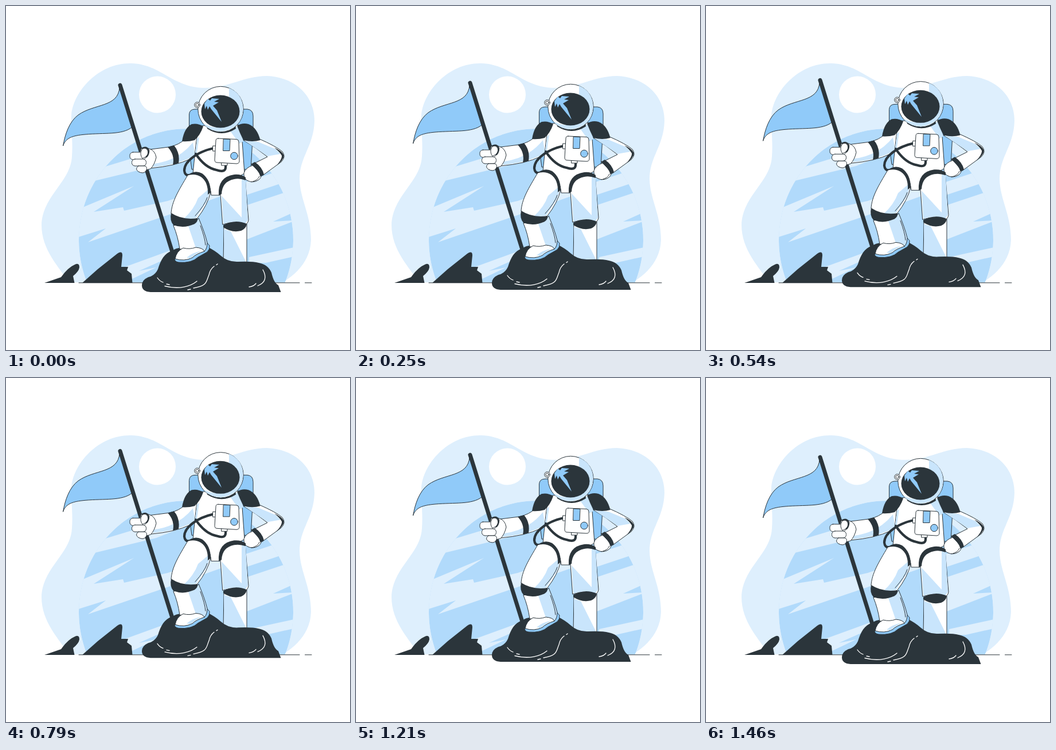
Recreate the animation shown at these times as an HTML page. Size 600x600 px, loop 1.5 s.

```html
<!DOCTYPE html>
<html lang="en">
<head>
<meta charset="utf-8">
<title>Astronaut with flag</title>
<style>
  html, body { margin: 0; height: 100%; overflow: hidden; background: #fff; }
  svg { display: block; width: 100vw; height: 100vh; }
  .pale { fill: #deeffd; }
  .planet { fill: #b1dafb; }
  .shade { fill: #c9e5fc; }
  .blue { fill: #90caf9; }
  .white { fill: #fff; }
  .dark { fill: #2b353b; }
  .line { stroke: #2b353b; stroke-width: 1; stroke-linejoin: round; stroke-linecap: round; }
  .none { fill: none; }
  .tube { fill: none; stroke: #2b353b; stroke-linecap: round; }
  .crack { fill: none; stroke: #fff; stroke-width: 1.3; stroke-linecap: round; }
</style>
</head>
<body>
<svg viewBox="0 0 600 600">
  <defs>
    <clipPath id="disc"><path d="M141 482A187 194 0 1 1 487 482Z"/></clipPath>
  </defs>

  <!-- sky -->
  <path class="pale" d="M218 100C262 101 280 129 322 140C377 152 408 122 455 122C505 124 538 157 538 200C537 245 512 262 512 302C513 338 532 364 532 408C531 443 508 467 482 482H110C92 455 62 425 62 382C64 330 113 307 115 262C117 232 113 213 114 190C118 148 162 99 218 100Z"/>
  <circle class="white" cx="264" cy="154.500" r="32"/>
  <g clip-path="url(#disc)">
    <ellipse class="planet" cx="314" cy="408" rx="187" ry="194"/>
    <g class="pale">
      <path d="M160 284L236 261L330 236V252L262 279L150 306Z"/>
      <path d="M120 357L223 314L153 359L204 351L206 357L282 340L380 306V330L290 362L143 412L174 388L120 405Z"/>
      <path d="M415 308L466 291L500 288V302L478 310L415 331Z"/>
      <path d="M415 349L484 326L510 320V359L497 362L466 376L500 374V376L415 409V380Z"/>
      <path d="M205 456L290 425V436L232 462L262 456L220 476L205 480Z"/>
      <path d="M424 438L502 421V437L453 448H424Z"/>
    </g>
  </g>

  <!-- ground -->
  <path class="line none" d="M127 482.800H512M521.500 482.800H533"/>
  <path class="dark" d="M67 483L96 473Q108 456 120 451Q128 447 128 456Q127 463 117 471L119.500 483Z"/>
  <path class="dark" d="M133 483L160 459L194 432Q203 426 203 435L201 455L213 455L211 461L219 467L220.500 483Z"/>

  <g id="hero">
    <!-- backpack -->
    <path class="blue line" d="M319.500 212V189Q320 180 330 180H421Q431 181 431 192V215L427 285H324L321 262Z"/>

    <!-- flag and pole -->
    <path class="blue line" d="M198 142C196 177 154 170 126 190C110 202 103 224 99.500 244C104 230 116 226 138 224C172 221 202 225 219 212Z"/>
    <path class="tube" stroke-width="7" d="M199 138L291 432"/>

    <!-- arm holding the pole -->
    <path class="white line" d="M312 232Q303 242 284 246L244 251L252 283Q296 279 321 267L330 262L340 215Z"/>
    <path class="shade" d="M326 238L330 261Q296 278 256 281L258 275Q300 270 326 238Z"/>
    <path class="dark" d="M282 246L293 243Q304 256 301 274L291 277Q295 260 282 246Z"/>

    <!-- arm on the hip -->
    <path class="white line" d="M414 234L440 231Q472 245 482 254Q489 263 480 272L447 296L430 276L456 263Q436 247 414 234Z"/>
    <path class="shade" d="M416 235L440 237L471 250L479 258L456 262Z"/>
    <path class="dark" d="M468 247Q482 253 485 261Q484 269 471 279Q482 267 481 261Q477 254 468 247Z"/>

    <!-- torso -->
    <path class="white line" d="M342 209Q333 218 331 243L326 292L356 318L358 330H373L380 311L416 292L412 236L406 208Z"/>
    <path class="shade" d="M388 214L407 210L414 236L407 240Z"/>
    <path class="shade" d="M333 232L337 228L332 262L329 263Z"/>
    <path class="tube" stroke-width="4.200" d="M362 248C335 254 311 270 311 287Q312 296 319 295M331 258Q347 282 367 286Q384 292 383 279"/>
    <path class="white line" d="M361 244h6v9h-6zM376 273h10v5h-10z"/>
    <path class="white line" d="M370 231L402 232.500Q406 233 406 237L407 270Q407 275 402 275L368 273Q364 273 364 268L366 235Q366 231 370 231Z"/>
    <path class="blue line" d="M379.500 232L391 232.500L390 252.500H379Z"/>
    <circle class="blue line" cx="398" cy="261.500" r="6.300"/>
    <path class="dark" d="M307 236Q311 212 324 206Q335 204 344 210Q339 225 329 234Q318 237 307 236Z"/>
    <path class="dark" d="M403 209Q412 203 423 206Q438 212 443.500 234Q430 238 414 234Q408 222 403 209Z"/>

    <!-- hip hand -->
    <path class="white line" d="M430 278Q418 282 415 291Q414 299 420 304Q431 310 441 303Q446 299 445 294Z"/>
    <path class="line none" d="M428 307Q440 304 442 297"/>
    <path class="dark" d="M427 276L434 272Q447 281 450 294L444 298Q440 285 427 276Z"/>

    <!-- standing leg -->
    <path class="white line" d="M380 384L379 448H420V380Z"/>
    <path class="shade" d="M380 389L392 393L419 447H380Z"/>
    <path class="white line" d="M374 328Q375 301 398 298L417 300L423 373Q422 380 417 381Q399 374 378 381Z"/>
    <path class="shade" d="M376 331L411 369V302L418 303L422 373L417 380Q399 373 379 380Z"/>
    <path class="dark" d="M371 330Q369 298 398 294Q410 293 418 299V304Q407 300 398 302Q377 306 376 328Z"/>
    <path class="dark" d="M379 382Q400 371 420 380Q419 388 410 392Q394 396 379 386Z"/>

    <!-- rock -->
    <path class="dark" d="M237 487Q237 478 248 473Q260 470 265 459C270 443 276 431 290 427Q297 421 311 422L349 419Q364 426 374 435Q387 447 405 446Q430 445 441 448Q457 451 463 465Q467 483 475 487L479.500 499H252Q237 498 237 487Z"/>
    <path class="crack" d="M264 474Q268 480 274 482M280 485L285 486M277 488.500C302 495 322 489 333 480M317 495L322 494M327 492C352 488 349 480 354 469Q356 459 363 454M367 451.500L369 450M448 460Q459 480 439 488M424 490Q432 489 436 484"/>

    <!-- raised leg -->
    <path class="blue line" d="M294 441Q294 446 301 447Q324 449 335 438L351 429Q356 424 355 418L349 411L330 425Z"/>
    <path class="shade line" d="M325 384L336 370Q347 396 351 413Q351 423 346 428L331 423Z"/>
    <path class="white line" d="M292 383Q300 402 303 424L333 425L327 379Z"/>
    <path class="shade" d="M318 384L329 380L340 425L331 422Z"/>
    <path class="line none" d="M339 383Q347 404 348 417"/>
    <path class="white line" d="M295 441Q297 428 309 422Q320 425 331 421Q344 422 346 428Q332 432 325 439Q311 446 295 441Z"/>
    <path class="shade" d="M315 439Q325 430 341 427Q331 432 322 440Z"/>
    <path class="white line" d="M317 295C301 322 289 341 288 362Q309 380 333 371Q352 347 357 324Q352 294 328 291Z"/>
    <path class="shade" d="M354 319Q356 328 350 341L332 369Q322 374 309 372Q328 355 335 335Z"/>
    <path class="line none" d="M330 366Q347 347 351 334"/>
    <path class="dark" d="M315 296Q329 285 342 292Q357 303 357 325L352 329Q353 307 340 298Q329 291 315 296Z"/>
    <path class="dark" d="M288 361Q308 374 334 370Q335 376 329 380Q310 389 292 382Q285 374 288 361Z"/>

    <!-- helmet -->
    <path class="dark" d="M350 208Q376 220 400 208L401 214Q376 230 351 214Z"/>
    <circle class="white line" cx="374.500" cy="180" r="39.700"/>
    <path class="shade" d="M389 143Q413 153 413.700 180Q412 214 375 219Q354 218 344 205Q373 220 397 202L407 183L389 160Z"/>
    <ellipse class="dark" cx="374" cy="184" rx="33.500" ry="28.500"/>
    <path class="blue" d="M346 170L352 162L356 165L359 161L372 162L363 167L371 168L361 174L368 182L376 202L358 180L355 175L352 181L350 174L347 180Z"/>
    <circle class="white line" cx="333.500" cy="172.500" r="4.800"/>
    <circle class="white line" cx="333.500" cy="172.500" r="2.600"/>

    <!-- gripping hand -->
    <path class="white line" d="M236 249Q241 245 250 249Q260 252 262 264Q259 277 252 284L240 287L231 262Z"/>
    <rect class="white line" x="216" y="255" width="28" height="13" rx="5.500"/>
    <rect class="white line" x="219.500" y="267" width="25" height="12" rx="5.500"/>
    <path class="white line" d="M231 279H243Q248 283 243 289Q239 293 231 289Q224 284 231 279Z"/>
    <path class="white line" d="M236 252Q239 246 245 249Q250 255 246 262L238 266Q233 259 236 252Z"/>
    <path class="tube" stroke-width="2.500" d="M238 248Q245 244 249 252Q249 259 245 263"/>
  </g>
</svg>
<script>
  const hero = document.getElementById('hero');
  const period = 1500, steps = 36, middle = 17.5;

  // Linear bob, 12 px over half a period, stepped at 24 pictures per second.
  function draw(now) {
    const step = Math.floor(now % period / period * steps + 0.06) % steps;
    const y = (Math.abs(step - middle) - middle) / 1.5;
    hero.setAttribute('transform', `translate(0 ${y.toFixed(3)})`);
    requestAnimationFrame(draw);
  }
  draw(performance.now());
</script>
</body>
</html>
```
